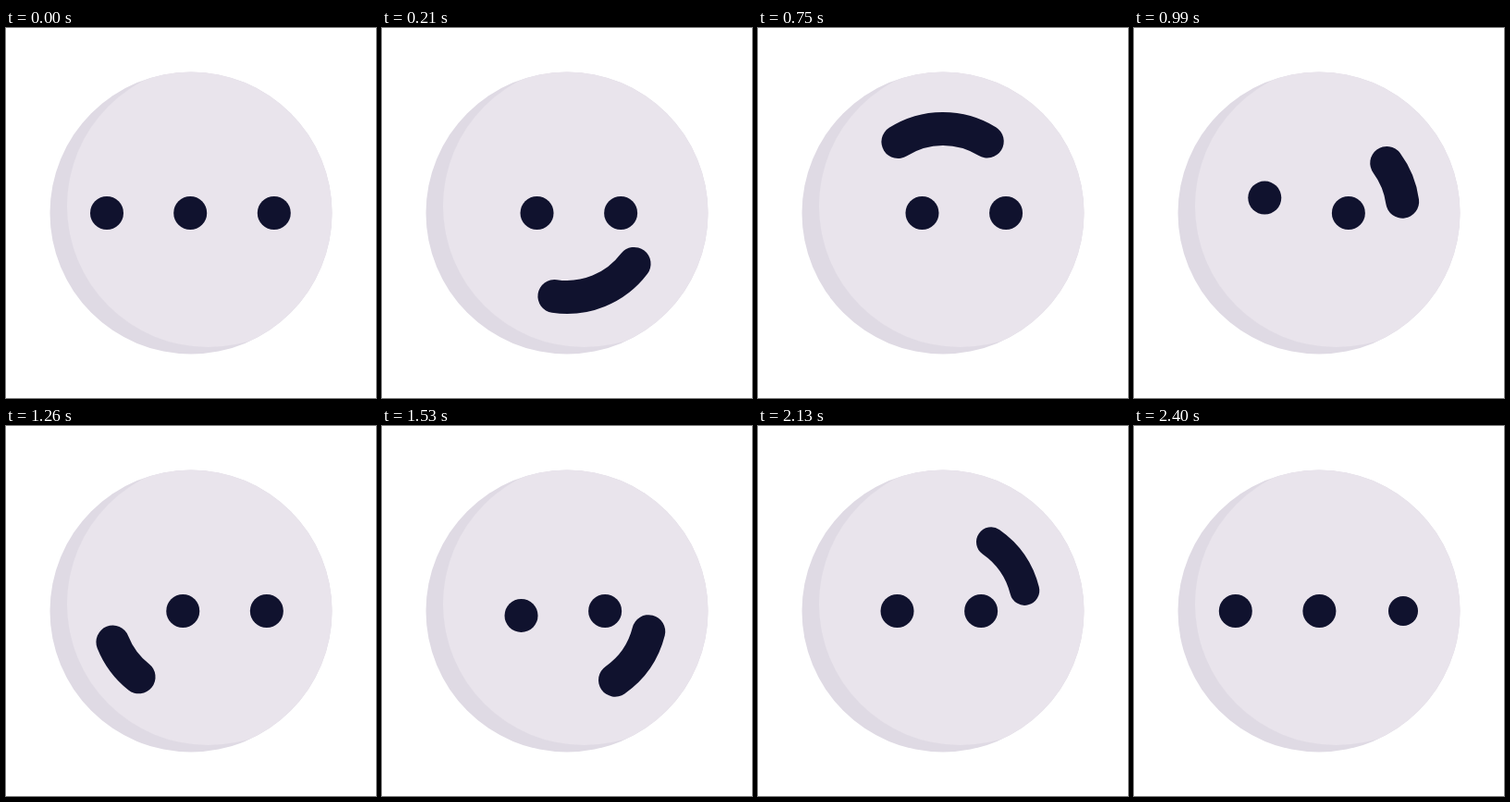
These frames come from a looping animation (400x400 px, 3.46 s). An HTML page:

```html
<!DOCTYPE html>
<html lang="en">
<head>
<meta charset="utf-8">
<title>Face loader</title>
<style>
  html, body { margin: 0; width: 100%; height: 100%; overflow: hidden; background: #fff; }
  svg { display: block; width: 100%; height: 100%; }
  #marks { fill: none; stroke: #10122e; stroke-width: 36; stroke-linecap: round; }
</style>
</head>
<body>
<svg viewBox="0 0 400 400">
  <clipPath id="face"><circle cx="200" cy="200" r="152.5"/></clipPath>
  <g clip-path="url(#face)">
    <rect width="400" height="400" fill="#dfdae4"/>
    <circle cx="218.5" cy="192.5" r="152.5" fill="#e9e4ec"/>
  </g>
  <g id="marks"><path id="left"/><path id="right"/><path id="mouth"/></g>
</svg>
<script>
const LOOP = 3460, TURN = 600, STEP = 30, R = 91;

// Each turn: eye start x, mouth side (1 below, -1 above), width, hop height and hop start
const turns = [
  { x: 199.2, side: 1, width: 36, hop: 19, from: 0.45 },
  { x: 200.1, side: -1, width: 36, hop: -111, from: 0.57 },
  { x: 200.3, side: 1, width: 36, hop: 23, from: 0.4 },
  { x: 200.3, side: -1, width: 32, hop: 0, from: 0.5 }
];
const HOP_TOP = 0.9;

const [left, right, mouth] = ["left", "right", "mouth"].map(id => document.getElementById(id));
const clamp = v => Math.min(1, Math.max(0, v));
const smooth = v => v * v * (3 - 2 * v);

// Cubic Bezier easing, solved by bisection
function bezier(x1, y1, x2, y2) {
  const at = (a, b, s) => 3 * a * s * (1 - s) ** 2 + 3 * b * s * s * (1 - s) + s ** 3;
  return p => {
    if (p <= 0 || p >= 1) return clamp(p);
    let lo = 0, hi = 1;
    for (let i = 0; i < 30; i++) {
      const mid = (lo + hi) / 2;
      if (at(x1, x2, mid) < p) lo = mid; else hi = mid;
    }
    return at(y1, y2, lo);
  };
}
const head = bezier(0.167, 0.167, 0, 1);
const tail = bezier(0.167, 0.167, 0.667, 1);

function dot(el, x, y) {
  el.setAttribute("d", `M${x} ${y}h.01`);
}

function onArc(v, side) {
  const a = Math.PI * (1 - v);
  return `${200 + R * Math.cos(a)} ${200 + side * R * Math.sin(a)}`;
}

function draw(t) {
  const n = Math.min(3, Math.floor(t / TURN));
  const p = clamp(t / TURN - n);
  const { x, side, width, hop, from } = turns[n];
  const lift = p < HOP_TOP ? (p - from) / (HOP_TOP - from) : (1 - p) / (1 - HOP_TOP);
  const eye = x - 90.5 * p;

  dot(left, eye, 200 + hop * smooth(clamp(lift)));
  dot(right, eye + 90.6, 200);

  const a = tail(p), b = head(p);
  mouth.style.strokeWidth = width;
  if (b - a < 0.0005) {
    dot(mouth, 200 - R * Math.cos(Math.PI * a), 200 + side * R * Math.sin(Math.PI * a));
  } else {
    mouth.setAttribute("d",
      `M${onArc(a, side)}A${R} ${R} 0 0 ${side > 0 ? 0 : 1} ${onArc(b, side)}`);
  }
}

const start = performance.now();
function tick() {
  const t = (performance.now() - start) % LOOP;
  draw(Math.min(4 * TURN, Math.floor(t / STEP) * STEP));
  requestAnimationFrame(tick);
}
tick();
</script>
</body>
</html>
```
